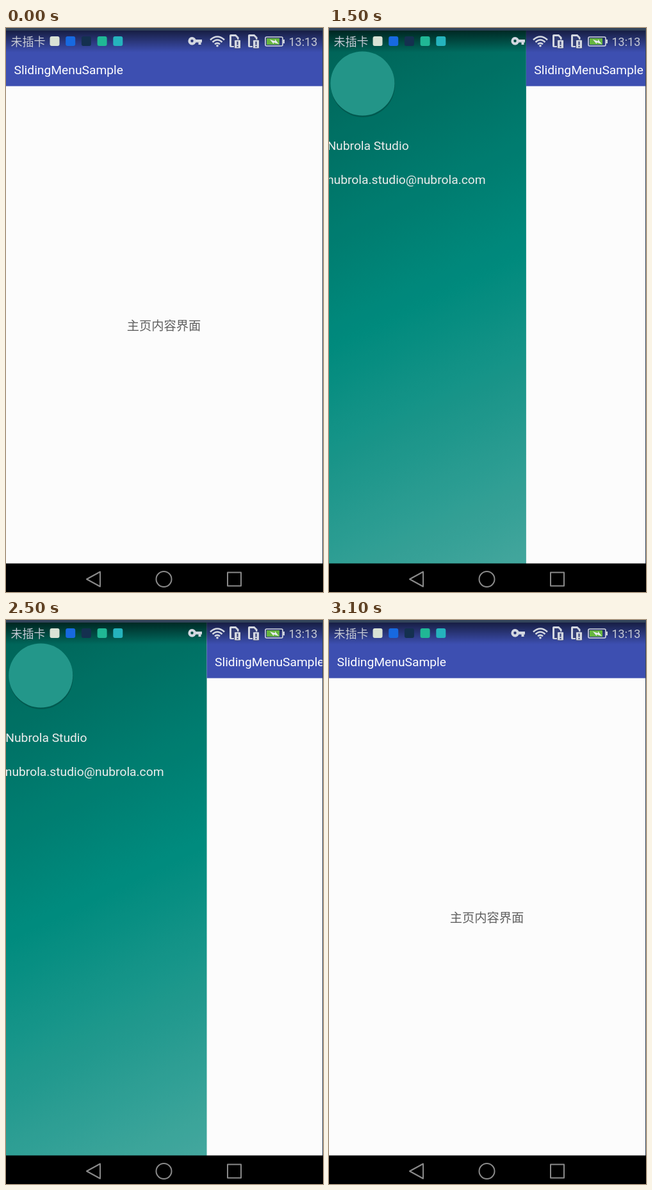
These frames come from a looping animation (495 px wide and 879 px high, 4 s). An HTML page:

```html
<!DOCTYPE html>
<html lang="zh">
<head>
<meta charset="utf-8">
<title>Sliding menu</title>
<style>
  html, body { margin: 0; width: 100%; height: 100%; overflow: hidden; background: #000; }
  svg { display: block; width: 495px; height: 879px; }
  text { font-family: Roboto, "Noto Sans CJK SC", "Noto Sans CJK", sans-serif; font-size: 19.25px; fill: #fff; }
  .clock { font-size: 18px; fill: #c5c9d4; }
  .label { fill: #5f5f5f; }
  .light { fill: #d3d7e0; }
  .line { fill: none; stroke: #d3d7e0; }
  .keys { fill: none; stroke: #8a8a8a; stroke-width: 2; stroke-linejoin: round; }
</style>
</head>
<body>
<svg viewBox="0 0 495 879">
  <defs>
    <linearGradient id="teal" gradientUnits="userSpaceOnUse" x1="395" y1="835" x2="0" y2="4">
      <stop offset="0" stop-color="#4db6ac"/>
      <stop offset=".5" stop-color="#009688"/>
      <stop offset="1" stop-color="#00695c"/>
    </linearGradient>
    <linearGradient id="scrim" x1="0" y1="0" x2="0" y2="1">
      <stop offset="0" stop-color="#000" stop-opacity=".62"/>
      <stop offset="1" stop-color="#000" stop-opacity="0"/>
    </linearGradient>
    <g id="sim">
      <path class="light" d="M2 0h8l4.500 4.500V20H2q-2 0-2-2V2q0-2 2-2z"/>
      <path d="M3 3h6l3 3v3H9q-2 0-2 2v7H3z" fill="#343f78"/>
      <rect class="light" x="7.5" y="8.500" width="10" height="13.500" rx="1.500" stroke="#343f78"/>
      <path d="M12.500 11v5.500m0 1.500v2" stroke="#343f78" stroke-width="2"/>
    </g>
  </defs>

  <rect width="495" height="879" fill="#33445a"/>

  <g id="menu">
    <rect y="4" width="396" height="831" fill="url(#teal)"/>
    <circle cx="82" cy="89" r="50" fill="#003f37" opacity=".4"/>
    <circle cx="81.5" cy="86.5" r="50" fill="#26a294"/>
    <text x="26.500" y="190">Nubrola Studio</text>
    <text x="26" y="243.300">nubrola.studio@nubrola.com</text>
  </g>
  <rect id="fade" y="4" width="396" height="831"/>

  <g id="page">
    <rect y="4" width="495" height="831" fill="#fcfcfc"/>
    <rect y="4" width="495" height="86.600" fill="#3d4fb1"/>
    <text x="12.500" y="71.500">SlidingMenuSample</text>
    <text class="label" x="188.800" y="470.700">主页内容界面</text>
  </g>

  <rect y="4" width="495" height="34" fill="url(#scrim)"/>

  <g id="status">
    <text class="clock" x="7.500" y="28">未插卡</text>
    <g id="apps"></g>
    <path class="light" fill-rule="evenodd" d="M296.500 18H306v4.500h-1.500V26h-4v-3.500h-4A6.300 6.300 0 1 1 296.500 18zM290.500 18a2.200 2.200 0 1 0 .01 0z"/>
    <g class="line" stroke-width="2.600">
      <path d="M319 18.500Q330 8.500 341 18.500"/>
      <path d="M322.500 22Q330 15 337.500 22"/>
      <path d="M326 25.300Q330 22 334 25.300"/>
    </g>
    <circle class="light" cx="330" cy="27.800" r="1.800"/>
    <use href="#sim" x="349" y="10"/>
    <use href="#sim" x="378" y="10"/>
    <rect class="line" x="405" y="14" width="27" height="14" rx="2" stroke-width="1.600"/>
    <rect class="light" x="432.500" y="18" width="2.500" height="6"/>
    <rect x="407" y="16" width="20" height="10" fill="#66b540"/>
    <path d="M412 18l8 2.500 0-3 6 7.500-8-2.500 0 2.500z" fill="#e8ecef"/>
    <text class="clock" x="441.500" y="27.500">13:13</text>
  </g>

  <rect x="494" y="0" width="1" height="835" fill="#33445a"/>
  <rect y="834.500" width="495" height="44.500"/>
  <g class="keys">
    <path d="M126 859L147 847.500v23z"/>
    <circle cx="246.500" cy="859" r="12"/>
    <rect x="346" y="848.500" width="21" height="21"/>
  </g>
</svg>
<script>
  const LOOP = 4000, STEP = 100, OPEN = 395.2, PARALLAX = 1 / 3, FADE = 0.35;
  const $ = id => document.getElementById(id);

  // Drawer position over time: [ms, px]
  const track = [
    [0, 0], [800, 0], [900, 27.5], [1300, 213.6], [1600, 355], [1700, 390.6], [1800, 394], [2000, OPEN],
    [2300, OPEN], [2400, 368], [2700, 204.6], [2900, 109], [3000, 48], [3100, 0], [LOOP, 0]
  ];

  function drawerAt(t) {
    const i = track.findIndex(p => p[0] > t);
    const [t0, x0] = track[i - 1], [t1, x1] = track[i];
    return x0 + (x1 - x0) * (t - t0) / (t1 - t0);
  }

  $("apps").innerHTML = ["#d9e2d5", "#1769e0", "#14304f", "#20b795", "#25b3bd"]
    .map((c, i) => `<rect x="${68.5 + i * 24.7}" y="13" width="15" height="15" rx="3" fill="${c}"/>`)
    .join("");

  function draw(t) {
    const x = drawerAt(Math.floor(t / STEP) * STEP);
    $("page").setAttribute("transform", `translate(${x} 0)`);
    $("menu").setAttribute("transform", `translate(${(x - OPEN) * PARALLAX} 0)`);
    $("fade").setAttribute("opacity", FADE * (1 - x / OPEN));
  }

  const start = performance.now();
  function tick() {
    draw((performance.now() - start) % LOOP);
    requestAnimationFrame(tick);
  }
  tick();
</script>
</body>
</html>
```
